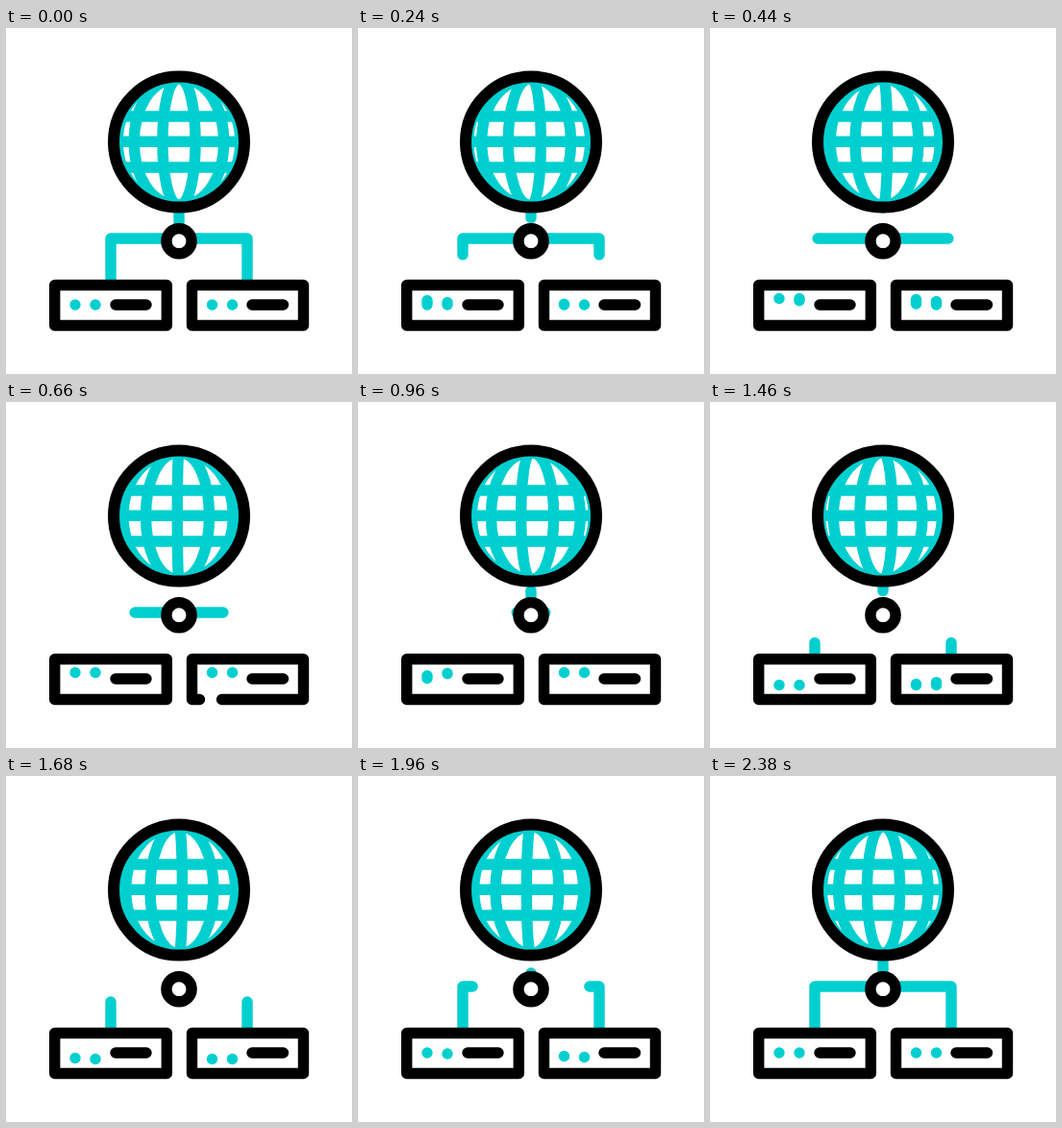
An HTML page without scripts for the animation above (2.4 s loop, 360 px wide and 360 px high).

```html
<!DOCTYPE html>
<html lang="en">
<head>
<meta charset="utf-8">
<title>Network</title>
<style>
  html, body { margin: 0; width: 100%; height: 100%; overflow: hidden; background: #fff; }
  svg { display: block; width: 100vw; height: 100vh; }
  path, circle { fill: none; stroke-linecap: round; stroke-linejoin: round; }
  .teal { stroke: #00cfd0; stroke-width: 11.4; }
  .black { stroke: #000; stroke-width: 11.4; }
  .black .box, .black .hub { fill: #fff; }

  /* Meridians sweep right to left; the bezier is a cosine ease */
  .meridian { animation: sweep 7.2s cubic-bezier(.3642, 0, .6358, 1) calc(var(--i) * -1.2s - .6s) infinite; }
  @keyframes sweep {
    from { d: path("M180 52.5C268 52.5 268 184.5 180 184.5"); }
    to { d: path("M180 52.5C92 52.5 92 184.5 180 184.5"); }
  }

  /* Cables leave the servers, then grow back out of them */
  .arm { stroke-dasharray: 121 130; animation: arm 2.4s linear infinite; }
  @keyframes arm {
    0% { stroke-dasharray: 121 130; stroke-dashoffset: 0; }
    10% { stroke-dashoffset: -33; }
    27.5% { stroke-dashoffset: -75; }
    46%, 49.99% { stroke-dasharray: 121 130; stroke-dashoffset: -121; }
    50% { stroke-dasharray: 0 251; stroke-dashoffset: 0; }
    70% { stroke-dasharray: 34 217; }
    81.67% { stroke-dasharray: 60 191; }
    100% { stroke-dasharray: 121 130; stroke-dashoffset: 0; }
  }

  .stem { animation: stem 1.2s linear infinite; }
  @keyframes stem {
    0% { d: path("M180 184V210"); }
    41.66% { d: path("M180 184V184.1"); }
    41.67%, 50% { d: path("M180 212V212.1"); }
    100% { d: path("M180 186V212.1"); }
  }

  .gap { stroke-dasharray: 316 0; animation: gap 2.4s linear infinite; }
  @keyframes gap {
    0%, 25% { stroke-dasharray: 316 0; stroke-dashoffset: 0; }
    27%, 28% { stroke-dasharray: 293 23; stroke-dashoffset: -11.5; }
    30%, 100% { stroke-dasharray: 316 0; stroke-dashoffset: 0; }
  }

  .dot { animation: bob 2.4s linear calc(var(--i) * 80ms) infinite backwards; }
  @keyframes bob {
    0% { d: path("M0 0V.01"); }
    3.33% { d: path("M0 -.7V.01"); }
    6.67% { d: path("M0 -2.5V.01"); }
    10% { d: path("M0 -4.5V0"); }
    13.33% { d: path("M0 -6.5V-2"); }
    16.67%, 35.83% { d: path("M0 -6.5V-6.49"); }
    42.5% { d: path("M0 -1.5V3"); }
    45.83% { d: path("M0 1V6.5"); }
    52.5% { d: path("M0 4.5V6.5"); }
    55.83%, 68.33% { d: path("M0 6.5V6.51"); }
    71.67% { d: path("M0 4.5V4.6"); }
    75% { d: path("M0 3.5V3.6"); }
    78.33% { d: path("M0 1V1.1"); }
    81.67%, 100% { d: path("M0 0V.01"); }
  }
</style>
</head>
<body>
<svg viewBox="0 0 360 360">
  <g class="teal">
    <path d="M121 92H239M115 118.3H245M121 145H239"/>
    <path class="meridian" style="--i:0" d="M180 52V185"/>
    <path class="meridian" style="--i:1" d="M180 52V185"/>
    <path class="meridian" style="--i:2" d="M180 52V185"/>
    <path class="meridian" style="--i:3" d="M180 52V185"/>
    <path class="meridian" style="--i:4" d="M180 52V185"/>
    <path class="meridian" style="--i:5" d="M180 52V185"/>
    <path class="stem" d="M180 184V210"/>
    <path class="arm" d="M109 269V219H180"/>
    <path class="arm" d="M251 269V219H180"/>
  </g>
  <g class="black">
    <circle cx="180" cy="118.6" r="68" stroke-width="12"/>
    <circle class="hub" cx="180" cy="221.7" r="13.1"/>
    <path class="box" d="M50.7 267.5H167.3V309.5H50.7Z"/>
    <path class="box gap" d="M213 309.5H193.5V267.5H309.5V309.5H213"/>
    <path d="M114 288H146M256 288H288.5"/>
  </g>
  <g class="teal">
    <path class="dot" style="--i:0" transform="translate(72 288)" d="M0 0V.01"/>
    <path class="dot" style="--i:1" transform="translate(93 288)" d="M0 0V.01"/>
    <path class="dot" style="--i:2" transform="translate(214.5 288)" d="M0 0V.01"/>
    <path class="dot" style="--i:3" transform="translate(235.5 288)" d="M0 0V.01"/>
  </g>
</svg>
</body>
</html>
```
